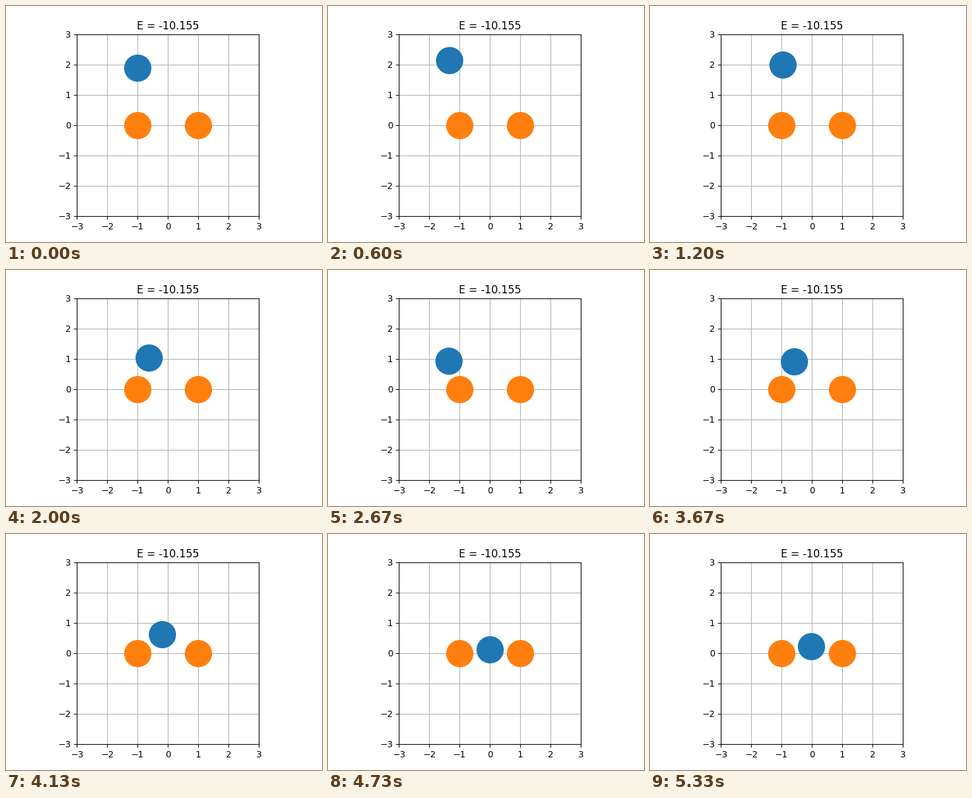
A matplotlib script for the animation above (5.4 s loop, 500x374 px).

```python
import numpy as np
import matplotlib.pyplot as plt
from matplotlib.animation import FuncAnimation

LOOP_MS = 5400
FRAMES = 81
MARKER_SIZE = 30
LEFT_X = -1

# Polar motion about the left disc: fall to contact, then roll into the gap
ANGLE_KEYS = {0: 90, 6: 102, 18: 89, 23: 74, 30: 70.4, 36: 100,
              42: 117, 52: 56, 54: 70, 61: 37.6, 70: 7, 79: 13}
RADIUS_KEYS = {0: 1.89, 13: 2.29, 18: 2.0, 30: 1.104, 36: 1.01}


def tween(keys, step):
    return np.interp(step, list(keys), list(keys.values()))


def position(step):
    angle = np.radians(tween(ANGLE_KEYS, step))
    radius = tween(RADIUS_KEYS, step)
    return LEFT_X + radius * np.cos(angle), radius * np.sin(angle)


def update(step):
    x, y = position(step)
    mover.set_data([x], [y])
    return mover,


fig, ax = plt.subplots(figsize=(5, 3.74), dpi=100)
ax.set_aspect("equal")
ax.set(xlim=(-3, 3), ylim=(-3, 3), xticks=range(-3, 4), yticks=range(-3, 4))
ax.grid(True)
ax.set_title("E = -10.155")

mover, = ax.plot([], [], "o", color="C0", ms=MARKER_SIZE)
ax.plot([LEFT_X, -LEFT_X], [0, 0], "o", color="C1", ms=MARKER_SIZE)
update(0)

anim = FuncAnimation(fig, update, frames=FRAMES, interval=LOOP_MS / FRAMES,
                     repeat=True, repeat_delay=0)
plt.show()
```
